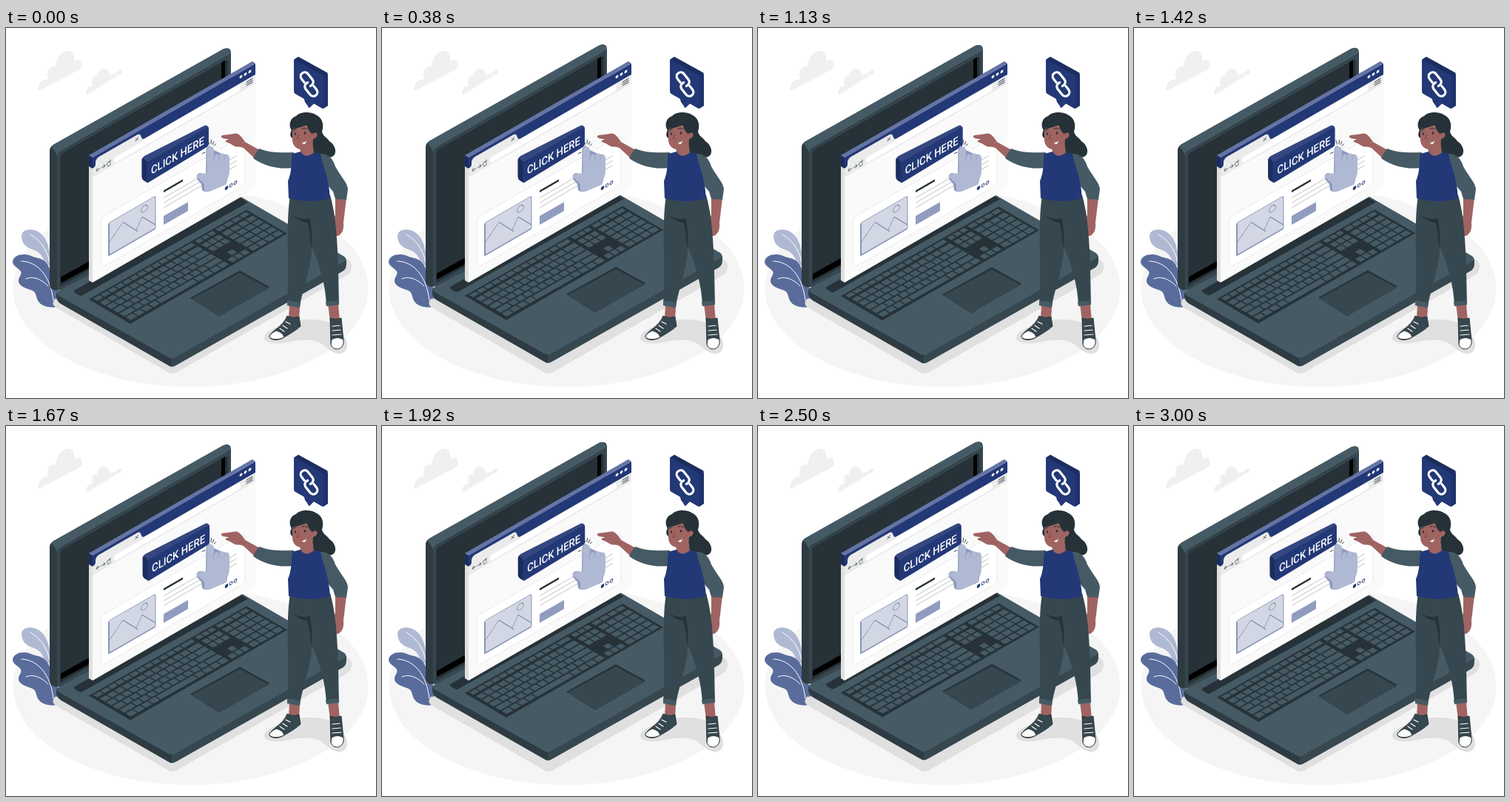
Animation of 500 by 500 pixels, one loop 3.04 s. Source, as an HTML page:

```html
<!DOCTYPE html>
<html lang="en">
<head>
<meta charset="utf-8">
<title>Click here</title>
<style>
html, body { margin: 0; width: 100%; height: 100%; overflow: hidden; background: #fff; }
svg { display: block; width: 100%; height: 100%; }
.navy { fill: #233876; }
.ink { fill: #263238; }
.slate { fill: #37474f; }
.steel { fill: #455a64; }
.side { fill: #2e3b42; }
.skin { fill: #9f6462; }
.pale { fill: #ebebeb; }
.line { fill: none; stroke-linecap: round; stroke-linejoin: round; }
</style>
</head>
<body>
<svg viewBox="0 0 500 500">
  <ellipse cx="249.500" cy="352" rx="240" ry="133" fill="#f5f5f5"/>

  <g fill="#f0f0f0">
    <path d="M43 82C44 74 50 68 57 69C53 58 59 51 67 52C68 40 77 29 86 31C92 33 93 39 92 45C97 41 103 43 103 49C103 54 98 57 94 59L46 84Q43 85 43 82Z"/>
    <path d="M108 88C108 82 112 78 118 78C114 70 117 64 123 65C124 58 129 54 134 55C139 56 140 61 140 66C143 61 147 62 148 64C149 58 156 55 157 58C157 61 155 62 153 63L111 89Q108 91 108 88Z"/>
  </g>

  <path fill="#b0b9d3" d="M21 281C21 272 34 270 43 275C56 282 60 300 61 322L52 318C50 307 44 302 35 299C26 296 21 290 21 281Z"/>
  <path class="line" stroke="#fff" d="M33 279C47 287 55 299 59 316"/>
  <path fill="#5a6c9c" d="M9 316C10 306 24 304 34 308C40 311 47 310 53 316C61 323 60 335 65 343C70 350 74 362 75 376C62 379 50 377 45 371C40 366 42 358 36 355C28 352 18 349 17 343C16 337 22 334 20 329C17 324 9 322 9 316Z"/>
  <path class="line" stroke="#fff" d="M21 315C43 316 60 335 64 368M27 339C37 334 50 341 57 349"/>

  <path fill="#e0e0e0" d="M66 366Q60 373 68 378L219 465Q225 469 231 465L461 334Q468 329 467 320Q466 314 458 311Z"/>

  <g id="laptop">
    <path class="side" d="M59 166Q59 161 64 158L294 28.500Q304 25 304 35V230L82 354L66 355Q59 353 59 347Z"/>
    <path class="slate" d="M69 171L304 36V230L82 354H69Z"/>
    <path class="steel" d="M61 161L64 158L294 28.500Q302 26 304 35L73 167Q69 170 69 173Q66 165 61 161Z"/>
    <path class="ink" d="M73 175Q73 170 78 168L296 44Q300 42 300 47V220L73 350Z"/>
    <path d="M291 47L296 44V72L291 75ZM74 337L113 315V324L74 345Z"/>
    <path class="side" d="M68 358L224 445V458Q222 458 219 456L74 373Q68 369 68 363Z"/>
    <path class="slate" d="M224 445L460 313V319Q460 326 455 329L230 456Q227 458 224 458Z"/>
    <path class="steel" d="M70 356L312 229Q317 227 322 231L457 309Q462 313 457 316L229 445Q224 448 219 445L71 362Q67 359 70 356Z"/>
    <path class="ink" d="M92 355L315 229L327 236L104 361Q101 363 98 361L93 358Q91 356 92 355Z"/>
    <path class="ink" d="M112 367L325 246L380 278L168 400Z"/>
    <g id="keys" class="steel" transform="matrix(2.13 -1.21 9.33 5.33 112 367)"/>
    <path class="ink" d="M249 365L316 328L356 350L288 390Z"/>
    <path class="slate" d="M251 366L316 331L355 352L288 390Z"/>
  </g>

  <path fill="#e0e0e0" d="M112 172L117 175V344L112 341Z"/>
  <path fill="#1b2c5e" d="M112 172L117 175V190L112 187Z"/>
  <path fill="#6474a5" d="M112 172L333 45L337 48L117 175Z"/>
  <g transform="matrix(1 -.577 0 1 117 175)">
    <rect width="220" height="169" fill="#fafafa"/>
    <rect width="220" height="15" class="navy"/>
    <rect y="15" width="220" height="12" class="pale"/>
    <rect x="29" y="16" width="171" height="9" rx="3" fill="#fff"/>
    <path class="pale" d="M0 15Q4 15 4 11V8Q5 4 9 4H60Q64 4 65 8L66 11Q67 15 71 15V17H0Z"/>
    <path class="line" stroke="#455a64" stroke-width=".7" d="M58 8L61.500 11.500M61.500 8L58 11.500M10 20.500H5L7 18.500M5 20.500L7 22.500M12 20.500H17L15 18.500M17 20.500L15 22.500M24 19A2.500 3 0 1 0 24.500 22M24 17V19.500H22"/>
    <path class="line" stroke="#455a64" stroke-width="1.200" d="M208 18H216M208 20.500H216M208 23H216"/>
    <circle cx="203" cy="20" r="2.200" fill="#fafafa" stroke="#cfcfcf" stroke-width=".6"/>
    <g fill="#fff"><circle cx="200.500" cy="6.500" r="1.900"/><circle cx="206.500" cy="6.500" r="1.900"/><circle cx="212.500" cy="6.500" r="1.900"/></g>

    <rect x="11" y="88" width="195" height="68" rx="6" fill="#fff" stroke="#e4e4e4" stroke-width=".8"/>
    <g stroke="#7d8bb3" stroke-width=".9" stroke-linejoin="round">
      <rect x="22" y="101" width="63" height="44" rx="2" fill="#d3d7e3"/>
      <path fill="none" stroke-width="1.600" d="M22 102V145H85"/>
      <path fill="none" d="M22 128L41 111L61 135M59 132L67 119L85 140"/>
      <circle cx="70" cy="109.500" r="4.300" fill="none"/>
    </g>
    <rect x="96" y="100" width="26" height="2.600" class="ink"/>
    <path class="line" stroke="#dadada" stroke-width="1.700" d="M97 110H194M97 116.500H194M97 123H194"/>
    <rect x="96" y="134.500" width="33" height="12" rx="1" fill="#909cc0"/>
    <g stroke="#233876" stroke-width=".9" fill="none">
      <circle cx="181" cy="145.500" r="1.900" class="navy"/><circle cx="187" cy="145.500" r="1.900"/><circle cx="193" cy="145.500" r="1.900"/>
    </g>
  </g>

  <path class="line" stroke="#263238" stroke-width=".9" d="M273 152L274.500 157M277.500 151.500L277 156.500M281 153.500L279 157.500M283.500 157L281 159M265.500 169.500L269 168"/>
  <g id="button">
    <path fill="#35477f" d="M184 176L187 173L268 132Q272 130 274 135L190 183Z"/>
    <path fill="#1b2c5e" d="M183.500 178Q183.500 175 187 177L191 182V209L186 206Q183.500 204 183.500 201Z"/>
    <path class="navy" d="M190 184Q190 181.500 192 180.500L271 135Q274 133 274 136V156Q274 159 272 160.500L193 208.500Q190 210 190 207Z"/>
    <text transform="matrix(.866 -.5 0 1 232 177.500)" text-anchor="middle" font-family="Roboto, Arial, sans-serif" font-weight="500" font-size="15.200" fill="#fff">CLICK HERE</text>
  </g>
  <g>
    <path fill="#8d9abd" d="M270.500 165Q271 160 275 159L281 165L302 175L299 205L298 211L274 221Q268 222 265 219L264 211L258 204Q256 198 262 196L270 197Z"/>
    <path fill="#b0b9d3" d="M271.500 165Q272 160 276 160Q281 160 281 166V174Q284 168 288 172Q291 167 295 171Q301 169 302 176V190C302 198 301 202 298 205V211L275 221Q270 222 268 219V211C265 207 262 204 258 203Q257 198 263 197C267 197 270 198 271.500 195Z"/>
    <path class="line" stroke="#8d9abd" stroke-width=".7" d="M281 173V180M288 172V178M295 171V176"/>
  </g>

  <g>
    <path fill="#1f316b" d="M389 43L395 39L433 60Q435 61 435 64V105L429 109L416 102L410 108L404 100Z"/>
    <path fill="#1b2c5e" d="M389 43L395 39L435 61L429 65Z"/>
    <path class="navy" d="M389 45Q389 42 392 44L427 63Q429 64 429 67V106Q429 110 426 108L416 102L409 108L405 97L391 89Q389 88 389 85Z"/>
    <g class="line" stroke="#fff" stroke-width="3.200" transform="translate(409.500 76) rotate(52)">
      <path d="M-6 3.500H-12A5.500 5.500 0 0 1 -12 -7.500H-2A5.500 5.500 0 0 1 3 0"/>
      <path d="M6 -3.500H12A5.500 5.500 0 0 1 12 7.500H2A5.500 5.500 0 0 1 -3 0"/>
    </g>
  </g>

  <path fill="#e0e0e0" d="M349 419C350 407 368 405 380 400C393 393 418 391 438 398L458 418C465 431 459 441 449 440C437 439 432 428 421 424C406 418 387 424 372 426C360 427 349 425 349 419Z"/>

  <g>
    <path class="skin" d="M343 165L323 154C318 146 313 141 308 143L292 145Q289 147 293 148.500L302 150L297 152Q296 154 300 155C304 156 307 160 312 160.500C317 160.500 319 161 322 163L338 178Z"/>
    <path class="skin" d="M445 230H460L456 263C457 270 455 279 448 281C442 282 438 278 437.500 271C437 265 443 260 445 252Z"/>
    <path class="line" stroke="#7b4a48" stroke-width=".8" d="M444 262Q441 268 441 276M293 148.500L302 150"/>

    <path class="skin" d="M383 374L397 376L396 395L382 392ZM435 373H449L451 396H438Z"/>
    <path class="slate" d="M384 226H438C447 256 449 300 450 373L433 375C432 345 422 315 413 296C413 324 403 344 397 376L380 372C384 330 377 270 384 226Z"/>
    <path class="ink" d="M388 253Q398 260 411 257Q414 275 413 300Q410 270 407 263Q396 262 388 253Z"/>
    <path class="steel" d="M380 368L398 371L397 378L380 375ZM432 370L450 368V374L433 376Z"/>

    <g stroke="#263238" stroke-width=".9">
      <path class="slate" d="M380 389Q388 393 396 390L398 403C389 411 379 416 372 420C364 423 355 421 356 416C360 408 374 404 380 389ZM438 392Q446 395 453 392L456 422C457 436 441 437 439 427Z"/>
      <path fill="#fff" d="M365 409Q374 411 376 418Q365 423 357 419Q353 415 365 409ZM440 421Q448 416 456 421C458 435 443 438 439 428Z"/>
    </g>
    <path class="line" stroke="#fff" stroke-width="1.200" d="M378 397L384 400M374 402L380 406M370 406L376 410M441 403L451 402M441 409L452 408M441 415L453 414"/>

    <path class="ink" d="M387 149C383 147 384 141 386 138C381 132 384 121 392 119C397 113 412 112 420 118C428 122 430 132 427 140C428 146 434 148 437 153C444 157 447 166 444 171C440 177 430 175 424 173C416 171 412 164 412 156Z"/>
    <path class="skin" d="M397 158L414 150L416 170Q406 181 398 169Z"/>
    <path class="skin" d="M387 137C389 130 398 132 406 128C408 138 411 142 415 142C422 139 423 148 415 150C415 158 410 164 403 164C393 165 388 160 387 152Z"/>
    <path class="ink" d="M385 138C388 126 399 129 411 127L417 137L414 144Q409 139 407 131Q398 134 385 138Z"/>
    <g class="line" stroke="#263238">
      <path d="M388 139L392 137M400 136Q404 134 407 137"/>
      <path stroke="#7b4a48" d="M396 143L393 150H397"/>
    </g>
    <g class="ink"><ellipse cx="391" cy="143" rx="1.200" ry="1.700"/><ellipse cx="404" cy="142" rx="1.300" ry="1.800"/></g>
    <path fill="#fff" d="M400 155Q403 155 406 152.500Q405 157 402 157Z"/>

    <path class="steel" d="M389 168C370 169 355 168 342 163Q337 169 334 176C351 188 370 191 387 189Z"/>
    <path class="steel" d="M423 170C436 169 442 177 445 187C452 200 462 210 462 218L460 232L445 231L442 221L428 205Z"/>
    <path class="navy" d="M387 170L398 167Q405 178 416 168L425 170C427 184 436 198 438 230Q410 238 382 230L381 207C387 193 385 181 387 170Z"/>
  </g>
</svg>
<script>
const byId = id => document.getElementById(id);
const LOOP = 3040, LEAD = 20;

function addKey(u, row, w) {
  const key = document.createElementNS('http://www.w3.org/2000/svg', 'rect');
  const box = { x: u + .3, y: .22 + row * .94, width: w - .7, height: row ? .74 : .58 };
  for (const name in box) key.setAttribute(name, box[name]);
  byId('keys').append(key);
}

function addKeys(u, row, count, w) {
  for (let i = 0; i < count; i++) addKey(u + i * w, row, w);
}

for (let row = 0; row < 6; row++) {
  const start = [0, 0, 2, 3, 5, 0][row];
  if (start) addKey(1.5, row, start + 3);
  if (row < 5) {
    const from = start ? start + 4.5 : 1.5;
    const count = Math.floor((58 - from) / 4.6);
    addKeys(from, row, count, 4.6);
    addKey(from + count * 4.6, row, 64.5 - from - count * 4.6);
  } else {
    addKeys(1.5, row, 4, 4.8);
    addKey(20.7, row, 24);
    addKeys(44.7, row, 4, 4.95);
  }
  if (row < 3 || row === 5) addKeys(66, row, 3, 3.9);
  if (row === 4) addKey(69.9, row, 3.9);
  addKeys(79, row, 4, 5);
}

// Sideways offsets at every tenth of the cycle.
const shake = [0, -1, 2, -4, 4, -4, 4, -4, 2, -1, 0];

function draw(now) {
  const t = (now % LOOP + LEAD) % 3000;
  const lift = 10 * (1 - Math.abs(t % 1500 / 750 - 1));
  const step = t / 300, i = Math.floor(step);
  const shift = shake[i] + (shake[i + 1] - shake[i]) * (step - i);
  byId('laptop').setAttribute('transform', `translate(0 ${-lift})`);
  byId('button').setAttribute('transform', `translate(${shift} 0)`);
}

const began = performance.now();
function tick() {
  draw(performance.now() - began);
  requestAnimationFrame(tick);
}
tick();
</script>
</body>
</html>
```
